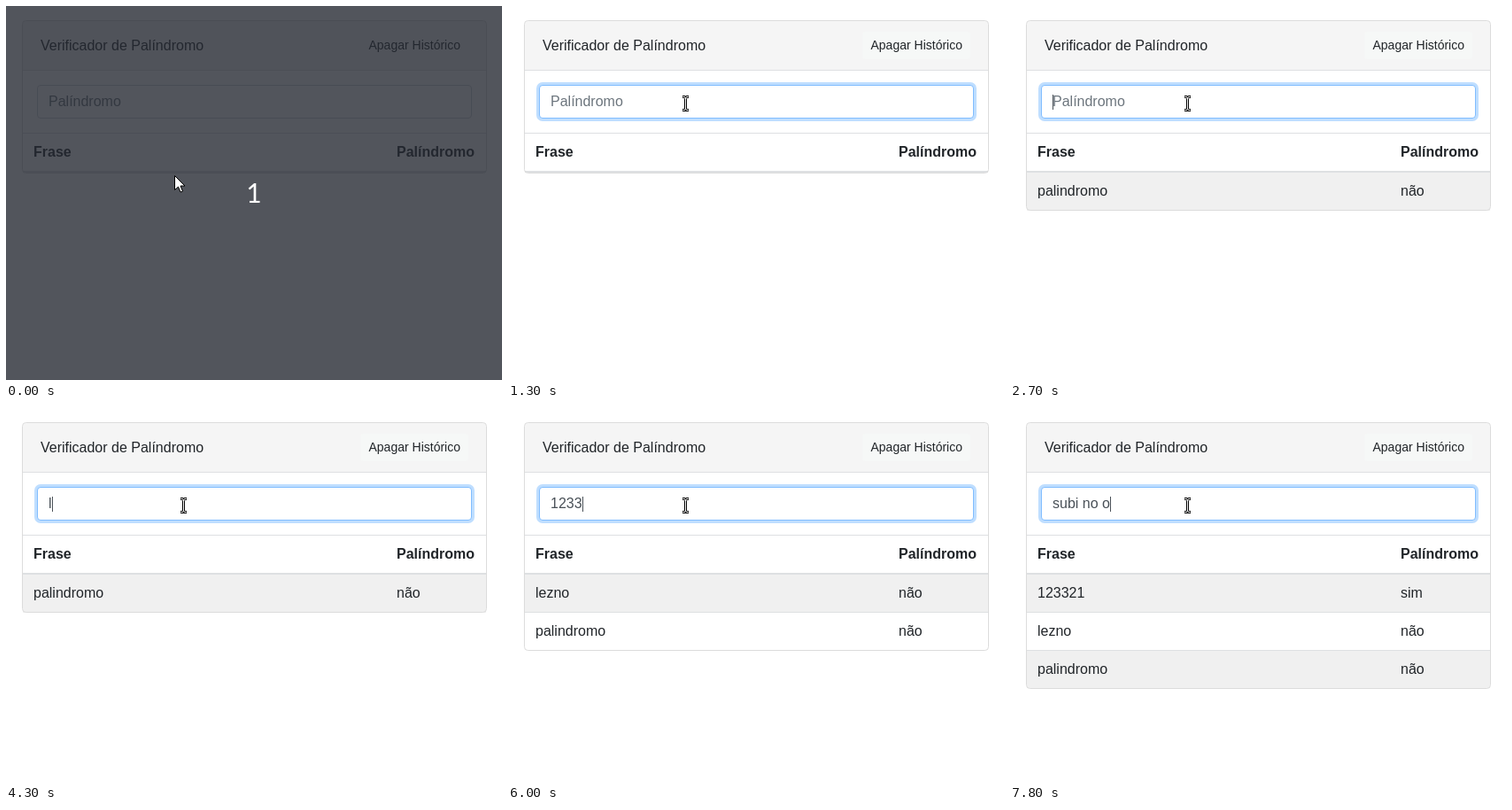
Write an HTML page that moves like this. It is 560 by 422 pixels and loops after 8000 ms.

```html
<!DOCTYPE html>
<html lang="pt">
<head>
<meta charset="utf-8">
<title>Verificador de Palíndromo</title>
<style>
  html, body { margin: 0; width: 100%; height: 100%; overflow: hidden; background: #fff; }
  svg { display: block; }
  text { font: 16px "Liberation Sans", Arial, sans-serif; fill: #212529; white-space: pre; }
  .bold { font-weight: bold; }
  .small { font-size: 14px; }
  #count { font: 30px Lato, sans-serif; fill: #fff; text-anchor: middle; }
  .line { fill: #dee0e2; }
</style>
</head>
<body>
<svg width="560" height="422" viewBox="0 0 560 422">
  <path d="M19 72V20.5a3.5 3.5 0 0 1 3.5-3.5H538.5a3.5 3.5 0 0 1 3.5 3.5V72Z" fill="#f5f5f5"/>
  <rect class="line" x="19" y="72" width="523" height="1"/>
  <rect x="400.5" y="29" width="121.5" height="31" rx="3" fill="#f6f8f7"/>
  <text x="39" y="50">Verificador de Palíndromo</text>
  <text x="409.5" y="49" class="small">Apagar Histórico</text>
  <rect id="glow" x="32" y="86" width="497" height="44" rx="7" fill="#bfdeff"/>
  <rect id="field" x="35.5" y="89.5" width="490" height="37" rx="3.5" fill="#fff"/>
  <text id="entry" x="48" y="113"></text>
  <rect id="caret" y="100" width="1" height="17" fill="#495057"/>
  <rect class="line" x="19" y="143" width="523" height="1"/>
  <text x="31" y="170" class="bold">Frase</text>
  <text x="441" y="170" class="bold">Palíndromo</text>
  <g id="rows"></g>
  <rect class="line" x="19" y="186" width="523" height="2"/>
  <rect id="card" x="18.5" y="16.5" width="524" rx="4" fill="none" stroke="#dcdcdc"/>
  <g id="overlay">
    <rect width="560" height="422" fill="rgb(36,40,49)" fill-opacity=".79"/>
    <text id="count" x="280" y="222">1</text>
  </g>
  <path id="arrow" d="M0 0V16L4 12.5 6.5 18.5 9 17.5 6.5 11.5H11.5Z" fill="#fff" stroke="#000"/>
  <g id="beam" fill="none">
    <path d="M-3.5-7.5H-1.5L0-6.5 1.5-7.5H3.5M0-6.5V6.5M-3.5 7.5H-1.5L0 6.5 1.5 7.5H3.5" stroke="#000" stroke-width="3"/>
    <path d="M-3-7.5H-1.5L0-6.5 1.5-7.5H3M0-6.5V6.5M-3 7.5H-1.5L0 6.5 1.5 7.5H3" stroke="#fff"/>
  </g>
</svg>
<script>
const LOOP = 8000, FOCUS = 800, TEXT_X = 48, ROW_H = 43;
const $ = id => document.getElementById(id);

// Each step sets the field's text; an empty text submits the one before it.
const typing = [
  [FOCUS, ''],
  [1500, 'p'], [1700, 'pal'], [1900, 'pali'], [2000, 'palin'], [2200, 'palind'],
  [2400, 'palindro'], [2500, 'palindrom'], [2600, 'palindromo'], [2700, ''],
  [4300, 'l'], [4400, 'le'], [4500, 'lez'], [4600, 'lezn'], [4700, 'lezno'], [4900, ''],
  [5400, '12'], [5600, '123'], [6000, '1233'], [6100, '12332'], [6500, '123321'], [6700, ''],
  [7100, 's'], [7200, 'su'], [7300, 'sub'], [7400, 'subi'], [7500, 'subi '],
  [7600, 'subi n'], [7700, 'subi no'], [7800, 'subi no o']
];

// Pointer position at [time, x, y]
const pointer = [
  [0, 190.5, 191.5], [300, 212.5, 181.5], [400, 215.5, 164.5],
  [500, 212.5, 142.5], [600, 205.5, 120], [700, 200.5, 110]
];

const isPalindrome = s => s === [...s].reverse().join('');
const show = (id, on) => $(id).setAttribute('visibility', on ? 'visible' : 'hidden');
const latest = (list, t) => list.filter(step => step[0] <= t).pop();

function rowMarkup(phrase, i) {
  const y = 188 + i * ROW_H;
  const answer = isPalindrome(phrase) ? 'sim' : 'não';
  return `<rect x="19" y="${y - (i ? 1 : 0)}" width="523" height="${ROW_H}" fill="${i % 2 ? '#fff' : '#f0f0f0'}"/>
    ${i ? `<rect class="line" x="19" y="${y - 1}" width="523" height="1"/>` : ''}
    <text x="31" y="${y + 26}">${phrase}</text><text x="441" y="${y + 26}">${answer}</text>`;
}

function drawField(t) {
  const [since, text] = latest(typing, t) || [0, ''];
  const focus = t < FOCUS ? 0 : t < FOCUS + 100 ? 0.6 : 1;
  $('glow').setAttribute('opacity', focus);
  $('field').setAttribute('stroke', focus ? '#80bdff' : '#ced4da');

  const entry = $('entry');
  entry.textContent = text || 'Palíndromo';
  entry.style.fill = text ? '#495057' : '#6c757d';
  const width = text ? entry.getComputedTextLength() : 0;
  $('caret').setAttribute('x', Math.round(TEXT_X + width));
  show('caret', focus && (t - since) % 1100 < 500);
}

function drawRows(t) {
  const phrases = typing
    .map(([time, text], i) => time <= t && !text && i ? typing[i - 1][1] : '')
    .filter(Boolean).reverse();
  $('rows').innerHTML = phrases.map(rowMarkup).join('');
  const bottom = phrases.length ? 187.5 + phrases.length * ROW_H : 188.5;
  $('card').setAttribute('height', bottom - 16.5);
}

function drawPointer(t) {
  const [, x, y] = latest(pointer, t);
  const inField = y < 127;
  show('arrow', !inField);
  show('beam', inField);
  $(inField ? 'beam' : 'arrow').setAttribute('transform', `translate(${x} ${y})`);
}

let start, drawn = -1;
function frame(now) {
  start ??= now;
  const t = Math.floor((now - start) % LOOP / 100) * 100;
  if (t !== drawn) {
    drawn = t;
    show('overlay', t < 300);
    drawField(t);
    drawRows(t);
    drawPointer(t);
  }
  requestAnimationFrame(frame);
}
requestAnimationFrame(frame);
</script>
</body>
</html>
```
